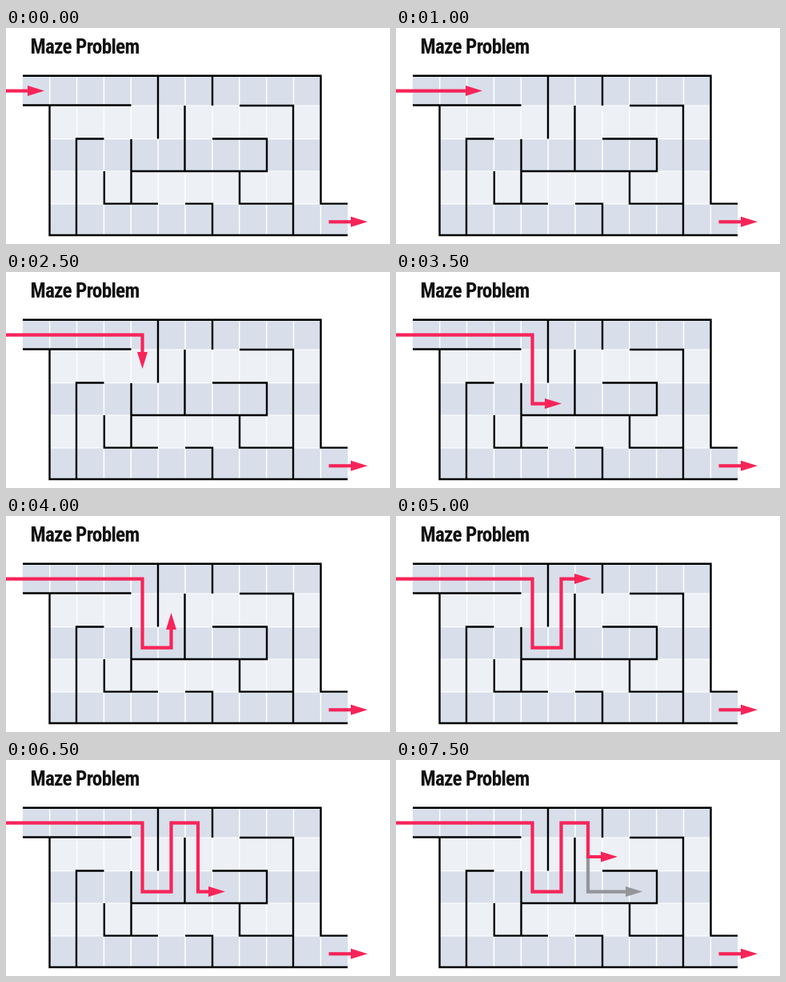
These frames come from a looping animation (480 px wide and 270 px high, 8000 ms). An HTML page:

```html
<!DOCTYPE html>
<html lang="en">
<head>
<meta charset="utf-8">
<title>Maze Problem</title>
<style>
  html, body { margin: 0; width: 100%; height: 100%; overflow: hidden; background: #fff; }
  svg { display: block; width: 100vw; height: 100vh; }
  text {
    font-family: "Roboto Condensed", "Liberation Sans Narrow", Roboto, "Open Sans", sans-serif;
    font-weight: 700; font-stretch: 75%; letter-spacing: -.03em; fill: #111;
  }
  .line { fill: none; stroke-width: 4.2; stroke-linejoin: miter; }
</style>
</head>
<body>
<svg viewBox="0 0 480 270">
  <text id="title" x="30.5" y="33" font-size="24">Maze Problem</text>
  <g id="cells"></g>
  <path fill="none" stroke="#000" stroke-width="2.4" stroke-linejoin="miter" d="
    M21 59.7H393.5V219.6H427 M21 96.5H156.5 M54.5 96.5V259H427
    M190 59.7V138.5 M258 59.7V97 M292 97H359V259 M223.5 97V179
    M88 259V138.5H122.5 M156.5 139V219.6 M122.8 179V219.6H190
    M156.5 179H326V138.5H258 M292 179V219.6H359 M224 219.6H258V259"/>
  <g id="dead"></g>
  <g id="route"></g>
  <g id="exit"></g>
</svg>
<script>
const $ = id => document.getElementById(id);
const PINK = '#f72459', GREY = '#949599';
const STEP = 500;
const HEAD = 21, HALF = 6.5;

// Keep the title's natural proportions and choose the size from its width
const title = $('title');
const size = 24 * 136 / title.getComputedTextLength();
title.setAttribute('font-size', size);
title.setAttribute('y', 22.7 + size * 0.355);

function drawCells() {
  const rowY = [59.7, 97, 138.7, 179, 219.8, 259];
  const col = i => 20.8 + i * 33.87;
  let out = '';
  for (let r = 0; r < 5; r++) {
    const first = r ? 1 : 0, last = r === 4 ? 12 : 11;
    const y = rowY[r], h = rowY[r + 1] - y;
    const fill = r % 2 ? '#edf0f5' : '#d8dfea';
    out += `<rect x="${col(first)}" y="${y}" width="${col(last) - col(first)}" height="${h}" fill="${fill}"/>`;
    for (let c = first + 1; c < last; c++)
      out += `<path d="M${col(c)} ${y}v${h}" stroke="#fff" stroke-width="1.5"/>`;
    if (r) out += `<path d="M${col(first)} ${y}H${col(last)}" stroke="#fff" stroke-width="1.2"/>`;
  }
  $('cells').innerHTML = out;
}

// Polyline whose last point is the tip of the arrowhead
function arrow(points, color) {
  const [x, y] = points[points.length - 1];
  const [px, py] = points[points.length - 2];
  const len = Math.hypot(x - px, y - py);
  const ux = (x - px) / len, uy = (y - py) / len;
  const bx = x - ux * HEAD, by = y - uy * HEAD;
  const neck = [bx + ux, by + uy];
  const body = [...points.slice(0, -1), neck].join(' ');
  const head = [[x, y], [bx - uy * HALF, by + ux * HALF], [bx + uy * HALF, by - ux * HALF]].join(' ');
  return `<polyline class="line" points="${body}" stroke="${color}"/><polygon points="${head}" fill="${color}"/>`;
}

const Y1 = 78.6, Y2 = 121, Y3 = 164.6;
const X1 = 170.5, X2 = 206.5, X3 = 240;
const corners = [[-1, Y1], [X1, Y1], [X1, Y3], [X2, Y3], [X2, Y1], [X3, Y1], [X3, Y3]];
const turn = [...corners.slice(0, 6), [X3, Y2]];

// Number of corners already passed, then the tip
const steps = [
  [1, 48, Y1], [1, 76, Y1], [1, 108, Y1], [1, 141, Y1], [1, 170.5, Y1],
  [2, X1, Y2], [2, X1, Y3], [3, 207, Y3],
  [4, X2, Y2], [4, X2, Y1], [5, 244, Y1],
  [6, X3, Y2], [6, X3, Y3], [7, 274, Y3], [7, 308, Y3],
  [0, 277, Y2]
];

drawCells();
$('exit').innerHTML = arrow([[403.5, 242.3], [452, 242.3]], PINK);

let shown = -1;
function show(i) {
  if (i === shown) return;
  shown = i;
  const [passed, ...tip] = steps[i];
  const path = passed ? corners.slice(0, passed) : turn;
  $('route').innerHTML = arrow([...path, tip], PINK);
  $('dead').innerHTML = passed ? '' : arrow([[X3, Y2], [X3, Y3], [308, Y3]], GREY);
}

const start = performance.now();
function tick() {
  show(Math.floor((performance.now() - start) / STEP) % steps.length);
  requestAnimationFrame(tick);
}
tick();
</script>
</body>
</html>
```
